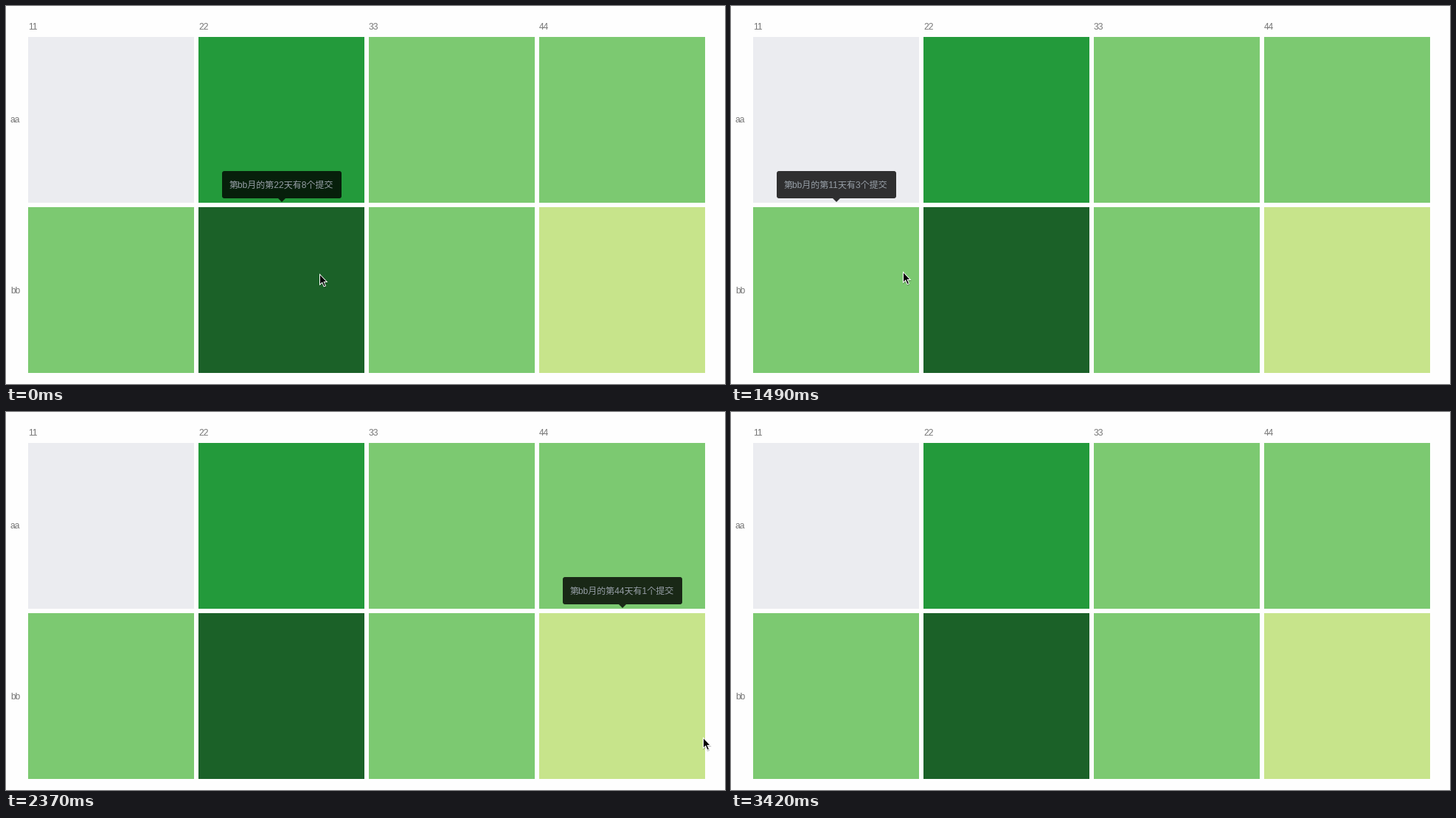
A matplotlib script that plays this animation: 975x513 px, repeating every 4.05 s.

```python
import matplotlib.pyplot as plt
import numpy as np
from matplotlib.animation import FuncAnimation
from matplotlib.patches import FancyBboxPatch, Polygon, Rectangle

W, H, DPI = 975, 513, 64
LOOP, STEP = 4050, 10
PX = 72 / DPI  # points per pixel
FONTS = ["Liberation Sans", "Noto Sans CJK JP"]

CELL, PITCH, LEFT, TOP = 225, 231, 30, 42
COLUMNS, ROWS = ["11", "22", "33", "44"], ["aa", "bb"]
COUNTS = [[0, 5, 3, 3], [3, 8, 3, 1]]
COLORS = {0: "#ebecf0", 1: "#c7e48b", 3: "#7cc971", 5: "#239a3b", 8: "#1b6128"}

# (start ms, cursor x, cursor y, hovered column)
STEPS = [
    (0, 425, 363, 1),
    (450, 330, 361, 1),
    (600, 248, 361, 1),
    (750, 231, 360, 0),
    (1490, 233, 360, 0),
    (1640, 282, 361, 1),
    (1790, 285, 363, 1),
    (1930, 292, 363, 1),
    (2230, 497, 358, 1),
    (2370, 945, 441, 3),
    (2670, 943, 449, 3),
    (2820, 945, 453, 3),
    (3120, 940, 454, 3),
    (3270, 937, 476, 3),
    (3420, None, None, None),
]
STARTS = [s[0] for s in STEPS]

OUTLINE = np.array([(0, 0), (0, 16.4), (3.6, 13.2), (5.9, 18.4),
                    (9.1, 17.1), (6.9, 12), (11.4, 12)])
ARROW = np.array([(1, 2.3), (1, 14.1), (3.9, 11.4), (6.4, 17.1),
                  (7.9, 16.5), (5.4, 10.9), (9.1, 10.9)])

fig = plt.figure(figsize=(W / DPI, H / DPI), dpi=DPI, facecolor="#fefefe")
ax = fig.add_axes([0, 0, 1, 1])
ax.set_xlim(0, W)
ax.set_ylim(H, 0)
ax.axis("off")


def label(x, y, text, color="#767676", **kw):
    return ax.text(x, y, text, family=FONTS, size=12 * PX, color=color,
                   va="baseline", **kw)


def polygon(points, color, **kw):
    return ax.add_patch(Polygon(points, fc=color, lw=0, **kw))


for c, name in enumerate(COLUMNS):
    label(LEFT + c * PITCH, 32, name)
for r, name in enumerate(ROWS):
    label(6, 158 + r * PITCH + r, name)
    for c, count in enumerate(COUNTS[r]):
        ax.add_patch(Rectangle((LEFT + c * PITCH, TOP + r * PITCH), CELL, CELL,
                               fc=COLORS[count], lw=0))

# Tooltip
bubble = ax.add_patch(FancyBboxPatch(
    (0, 224), 162, 37, boxstyle="round,pad=0,rounding_size=3",
    fc=(0, 0, 0, 0.8), lw=0, zorder=3))
POINTER = np.array([(-5, 261), (5, 261), (0, 266)])
pointer = polygon(POINTER, (0, 0, 0, 0.8), zorder=3)
tip_text = label(0, 247, "", "#959da5", zorder=4)

# Cursor layers: shadow, white outline, black arrow
layers = [
    (OUTLINE + (0.3, 1.5), polygon(OUTLINE, (0, 0, 0, 0.12), zorder=5)),
    (OUTLINE + (0.2, 0.8), polygon(OUTLINE, (0, 0, 0, 0.18), zorder=6)),
    (OUTLINE, polygon(OUTLINE, "white", zorder=7)),
    (ARROW, polygon(ARROW, "black", zorder=8)),
]
artists = [bubble, pointer, tip_text] + [patch for _, patch in layers]


def draw(i):
    k = np.searchsorted(STARTS, i * STEP, side="right") - 1
    _, x, y, col = STEPS[k]
    for artist in artists:
        artist.set_visible(col is not None)
    if col is None:
        return artists
    center = 143 + col * PITCH
    bubble.set_x(center - 81)
    pointer.set_xy(POINTER + (center, 0))
    tip_text.set_x(center - 71)
    tip_text.set_text(f"第bb月的第{COLUMNS[col]}天有{COUNTS[1][col]}个提交")
    for shape, patch in layers:
        patch.set_xy(shape + (x, y))
    return artists


anim = FuncAnimation(fig, draw, frames=LOOP // STEP, interval=STEP,
                     repeat=True, repeat_delay=0, blit=False)
plt.show()
```
